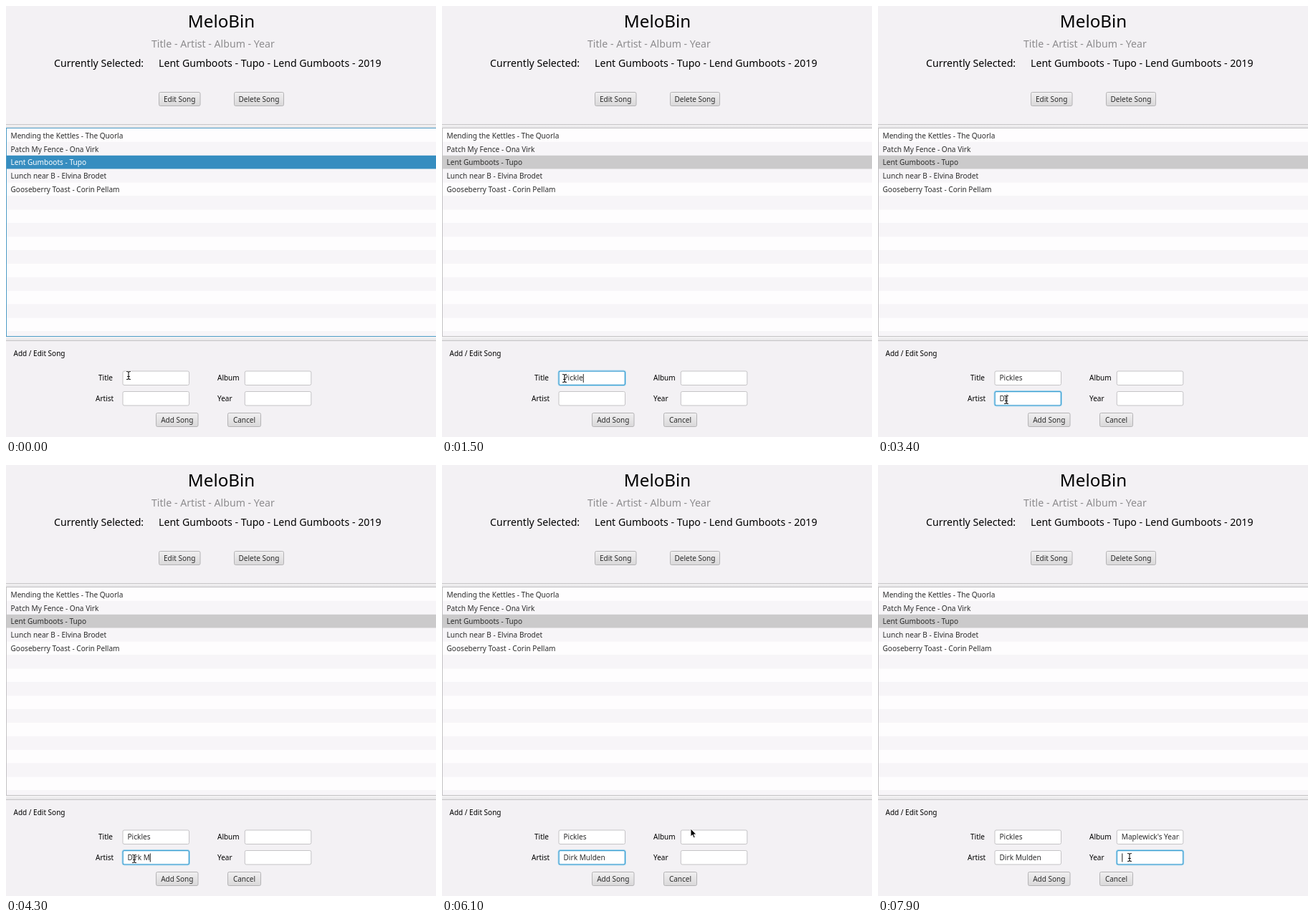
Write an HTML page that moves like this. It is 600 px wide and 602 px high and loops after 8000 ms.

```html
<!DOCTYPE html>
<html lang="en">
<head>
<meta charset="utf-8">
<title>Song library</title>
<style>
  html, body { margin: 0; width: 100%; height: 100%; overflow: hidden; background: #f3f1f4; }
  svg { display: block; }
  #stage { width: 600px; height: 602px; }
  text { font: 10.1px "Noto Sans", "Open Sans", sans-serif; fill: #2c2c2c; white-space: pre; }
  .title { font-size: 24.2px; fill: #000; text-anchor: middle; }
  .line { font-size: 14.15px; fill: #000; }
  .hint { fill: #8d8c8e; }
  .label { font-size: 10px; fill: #000; }
  .caption { font-size: 10px; text-anchor: middle; }
  .button { fill: url(#shade); stroke: #b4b3b5; }
  .box { fill: #fff; stroke: #c4c3c5; }
  .box.focus { stroke: #3d9fd2; stroke-width: 1.6; }
  .halo { fill: none; stroke: #a9d8ef; stroke-width: 1; visibility: hidden; }
  .focus + .halo { visibility: visible; }
  .frame { fill: none; stroke: #c3c2c4; }
  .frame.focus { stroke: #4d9cc6; }
  .selected { fill: #cbcacb; }
  .selected.focus { fill: #368dc0; }
  .focus + .chosen { fill: #fff; }
</style>
</head>
<body>
<svg id="stage" viewBox="0 0 600 602">
  <defs>
    <linearGradient id="shade" x2="0" y2="1">
      <stop offset="0" stop-color="#f1f0f1"/>
      <stop offset="1" stop-color="#d9d8d9"/>
    </linearGradient>
    <linearGradient id="split" x2="0" y2="1">
      <stop offset="0" stop-color="#f6f5f6"/>
      <stop offset="1" stop-color="#e3e2e4"/>
    </linearGradient>
  </defs>
  <rect width="600" height="602" fill="#f3f1f4"/>
  <text class="title" x="300.5" y="30">MeloBin</text>
  <text class="line hint" x="203" y="58">Title - Artist - Album - Year</text>
  <text class="line" x="67" y="85">Currently Selected:</text>
  <text class="line" x="213" y="85">Lent Gumboots - Tupo - Lend Gumboots - 2019</text>
  <g id="list"></g>
  <text class="label" x="10.5" y="489">Add / Edit Song</text>
  <g id="form"></g>
  <g id="pointer">
    <g id="beam" fill="none" stroke-linecap="round">
      <path d="M-2.5-5.5Q0-5.5 0-4Q0-5.5 2.5-5.5M0-4V4M-2.5 5.5Q0 5.5 0 4Q0 5.5 2.5 5.5M-1.5 1.5H1.5" stroke="#fff" stroke-width="2.6" opacity=".7"/>
      <path d="M-2.5-5.5Q0-5.5 0-4Q0-5.5 2.5-5.5M0-4V4M-2.5 5.5Q0 5.5 0 4Q0 5.5 2.5 5.5M-1.5 1.5H1.5" stroke="#111" stroke-width="1.1"/>
    </g>
    <path id="arrow" d="M0 0V11L2.5 8.7L4.3 12.8L6.2 12L4.4 8H7.8Z" fill="#000" stroke="#fff" stroke-width=".9"/>
  </g>
</svg>
<script>
const LOOP = 8000, STEP = 100, BLINK = 500;
const $ = id => document.getElementById(id);

function add(parent, tag, attrs, text) {
  const el = document.createElementNS('http://www.w3.org/2000/svg', tag);
  for (const key in attrs) el.setAttribute(key, attrs[key]);
  if (text) el.textContent = text;
  return parent.appendChild(el);
}

// Song list
const songs = [
  'Mending the Kettles - The Quorla',
  'Patch My Fence - Ona Virk',
  'Lent Gumboots - Tupo',
  'Lunch near B - Elvina Brodet',
  'Gooseberry Toast - Corin Pellam'
];
const TOP = 171, BOTTOM = 461, ROW = 18.9, CHOSEN = 2;
const list = $('list');
add(list, 'rect', { y: 165, width: 600, height: 6, fill: 'url(#split)' });
add(list, 'rect', { y: 165, width: 600, height: 1, fill: '#c6c5c7' });
add(list, 'rect', { y: 462, width: 600, height: 6, fill: 'url(#split)' });
add(list, 'rect', { y: 467, width: 600, height: 1, fill: '#c6c5c7' });
let selection;
for (let i = 0, y = TOP; y < BOTTOM; i++, y += ROW) {
  const row = add(list, 'rect', {
    y, width: 600, height: Math.min(ROW, BOTTOM - y), fill: i % 2 ? '#f7f5f8' : '#fefdfe'
  });
  if (i === CHOSEN) {
    row.setAttribute('class', 'selected');
    selection = row;
  }
  if (songs[i]) add(list, 'text', { x: 6.5, y: y + 13.6, class: i === CHOSEN ? 'chosen' : '' }, songs[i]);
}
const listFrame = add(list, 'rect', { class: 'frame', x: 0.5, y: 170.5, width: 610, height: 291 });

// Buttons
const form = $('form');
function button(x, y, w, caption) {
  add(form, 'rect', { class: 'button', x, y, width: w, height: 19, rx: 2 });
  add(form, 'text', { class: 'caption', x: x + w / 2, y: y + 13.3 }, caption);
}
button(213.5, 120.5, 57.5, 'Edit Song');
button(318.5, 120.5, 69, 'Delete Song');
button(209.5, 568.5, 58.5, 'Add Song');
button(309.5, 568.5, 46, 'Cancel');

// Fields: focus span, then first key and time between keys
const W = 92.5, H = 19.5, INNER = 80;
const fields = [
  { name: 'Title', labelX: 129, x: 163, y: 510, from: 300, to: 2000, value: 'Pickles', start: 700, gap: 150 },
  { name: 'Artist', labelX: 125, x: 163, y: 538.5, from: 2000, to: 6500, value: 'Dirk Mulden', start: 3150, gap: 225 },
  { name: 'Album', labelX: 295, x: 333.3, y: 510, from: 6500, to: 7700, value: "Maplewick's Yearning", start: 6950, gap: 30 },
  { name: 'Year', labelX: 295, x: 333.3, y: 538.5, from: 7700, to: LOOP, value: '', start: LOOP, gap: 1 }
];
for (const f of fields) {
  add(form, 'text', { class: 'label', x: f.labelX, y: f.y + 13.3 }, f.name);
  f.box = add(form, 'rect', { class: 'box', x: f.x, y: f.y, width: W, height: H, rx: 2 });
  add(form, 'rect', { class: 'halo', x: f.x - 1, y: f.y - 1, width: W + 2, height: H + 2, rx: 3 });
  const view = add(form, 'svg', { x: f.x + 6, y: f.y, width: INNER + 1, height: H });
  f.text = add(view, 'text', { y: 13.3 });
  f.caret = add(view, 'rect', { y: 4, width: 1, height: 12, fill: '#222' });
}

function drawField(f, t) {
  const focused = t >= f.from && t < f.to;
  const typed = Math.max(0, Math.min(f.value.length, Math.floor((t - f.start) / f.gap) + 1));
  f.box.classList.toggle('focus', focused);
  f.text.textContent = f.value.slice(0, typed);
  const width = typed ? f.text.getComputedTextLength() : 0;
  const shift = focused ? Math.max(0, width - INNER + 1) : 0;
  f.text.setAttribute('x', 0.5 - shift);
  f.caret.setAttribute('x', Math.max(1, width + 0.5 - shift));
  const lastKey = typed ? f.start + (typed - 1) * f.gap : f.from;
  const lit = (t - lastKey) % (2 * BLINK) < BLINK;
  f.caret.setAttribute('visibility', focused && lit ? 'visible' : 'hidden');
}

// Pointer stops: time, x, y
const path = [
  [0, 171, 516], [100, 171, 516], [300, 171, 520], [1700, 171, 520], [1950, 179, 550],
  [5500, 179, 550], [6100, 347, 508], [6300, 347, 518], [7500, 347, 518], [7700, 351, 548], [LOOP, 351, 548]
];

function drawPointer(t) {
  const i = path.findIndex(p => p[0] > t);
  const [t0, x0, y0] = path[i - 1], [t1, x1, y1] = path[i];
  const u = (t - t0) / (t1 - t0), k = u * u * (3 - 2 * u);
  const x = x0 + (x1 - x0) * k, y = y0 + (y1 - y0) * k;
  const over = fields.some(f => x > f.x && x < f.x + W && y > f.y && y < f.y + H);
  $('pointer').setAttribute('transform', `translate(${x} ${y})`);
  $('beam').setAttribute('visibility', over ? 'visible' : 'hidden');
  $('arrow').setAttribute('visibility', over ? 'hidden' : 'visible');
}

function draw() {
  const t = Math.floor(performance.now() % LOOP / STEP) * STEP;
  const listFocused = t < fields[0].from;
  selection.classList.toggle('focus', listFocused);
  listFrame.classList.toggle('focus', listFocused);
  fields.forEach(f => drawField(f, t));
  drawPointer(t);
  requestAnimationFrame(draw);
}
draw();
</script>
</body>
</html>
```
